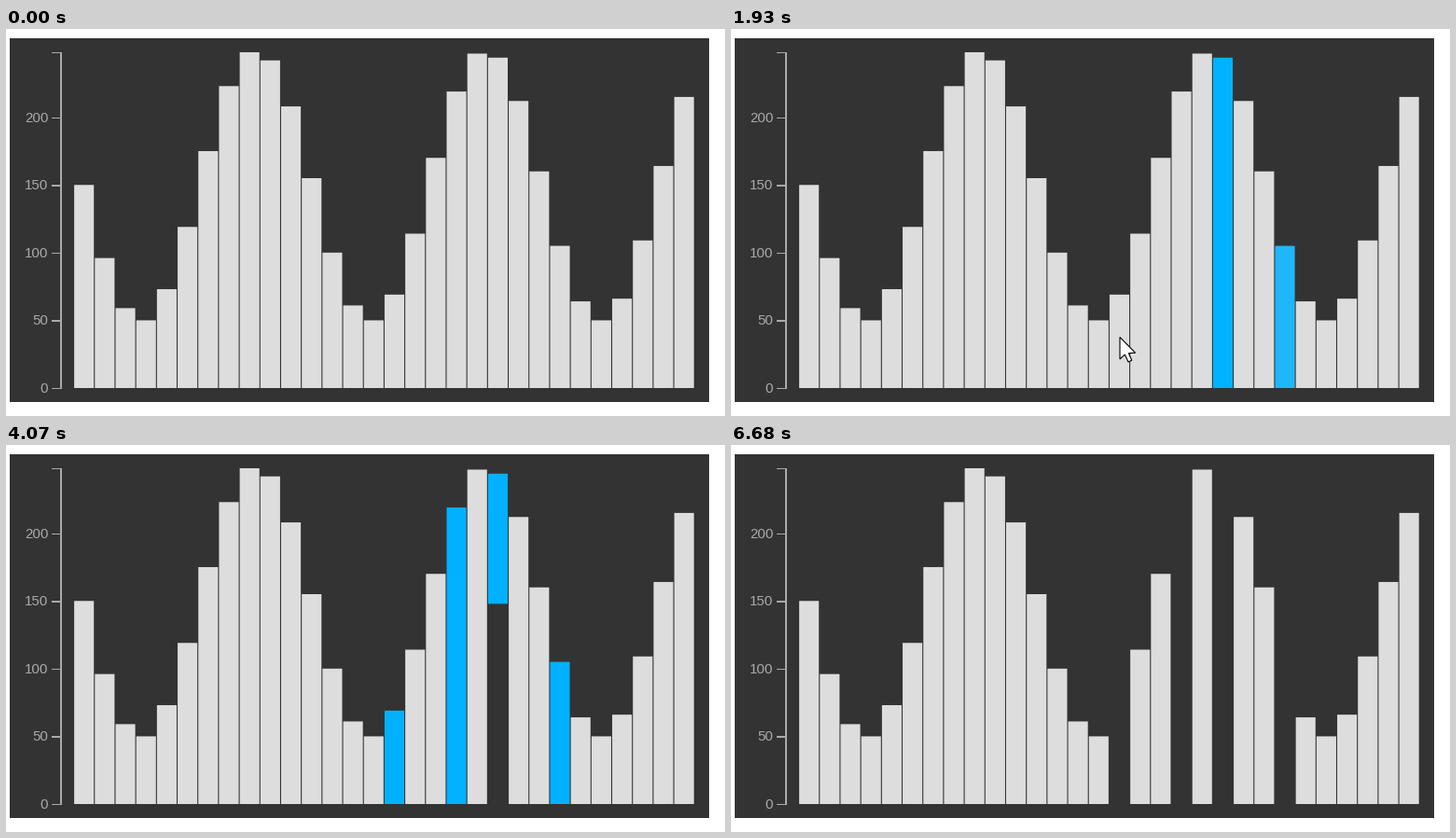
Animation of 771x416 px, one loop 6.98 s. Source, as a matplotlib script:

```python
import numpy as np
import matplotlib.pyplot as plt
from matplotlib.animation import FuncAnimation
from matplotlib.patches import Circle, Polygon, Rectangle

W, H, DPI = 771, 416, 100
LOOP, STEP = 6980, 20
TICK = 76.7                     # the picture is refreshed on this slower beat

TOP, BASE = 26, 386             # ends of the value axis
X0, PITCH, BAR_W = 73.1, 22.19, 21.1
GREY = np.array([221, 221, 221]) / 255
BLUE = np.array([0, 177, 255]) / 255
AXIS, LINE = "#aaaaaa", 1.45

TINT_MS = 1200
SHRINK_FROM, SHRINK_GAP, SHRINK_MS = 3500, 700, 1050
PRESS_LEAD, PRESS_HOLD = 60, 160

# clicks: bar, time, pointer height, time of moving on
CLICKS = [(20, 450, 334, 610), (23, 1104, 327, 1450),
          (15, 1980, 331, 2150), (18, 2662, 330.5, 2930)]
ENTER, ENTRY = 70, (532, 381)
LEAVE, EXIT = 3370, (549, 375.5)
ARROW = np.array([(0, 0), (0, 23.5), (5.3, 18.6), (9, 26.5), (12.8, 24.8),
                  (9.4, 17.2), (16.6, 16.8)]) + 0.5


def clamp(t):
    return min(max(t, 0), 1)


def cubic(t):
    """Cubic ease in and out."""
    t = clamp(t)
    return 4 * t ** 3 if t < 0.5 else 1 - 4 * (1 - t) ** 3


def pointer(t):
    """Glide from stop to stop, slowing down on arrival."""
    pos, left = np.array(ENTRY, float), ENTER
    stops = [((X0 + k * PITCH + BAR_W / 2, y), click - PRESS_LEAD, go)
             for k, click, y, go in CLICKS]
    for goal, arrive, go in stops + [(EXIT, LEAVE, LOOP)]:
        u = clamp((t - left) / (arrive - left))
        pos = pos + (np.array(goal) - pos) * (1 - (1 - u) ** 2)
        left = go
    return pos


def box(x, y, w, h, color, z=1):
    return ax.add_patch(Rectangle((x, y), w, h, fc=color, ec="none", lw=0, zorder=z))


fig = plt.figure(figsize=(W / DPI, H / DPI), dpi=DPI, facecolor="white")
ax = fig.add_axes([0, 0, 1, 1])
ax.set_xlim(0, W)
ax.set_ylim(H, 0)
ax.axis("off")

box(0, 0, W, 1, "#cccccc")
box(4, 11, 750, 390, "#333333")

values = np.floor(150 - 100 * np.sin(0.5663 * np.arange(30)))
scale = (BASE - TOP) / values.max()
heights = values * scale

# value axis
box(58.2, TOP, LINE, BASE - TOP + 1, AXIS)
box(49, TOP, 10, LINE, AXIS)
for value in range(0, 201, 50):
    y = BASE - value * scale
    box(49, y, 10, LINE, AXIS)
    ax.text(45.3, y + 5, str(value), color=AXIS, ha="right", va="baseline",
            family="Liberation Sans", fontsize=15 * 72 / DPI)

bars = [box(X0 + i * PITCH, BASE - h, BAR_W, h, GREY, 2) for i, h in enumerate(heights)]
for bar in bars:
    bar.set_snap(False)

arrow = ax.add_patch(Polygon(ARROW, fc="white", ec="black", lw=0.8,
                             joinstyle="miter", zorder=4))
halo = ax.add_patch(Circle((0, 0), 18, fc=(1, 1, 0, 0.54), ec="none", zorder=5))


def update(i):
    t = (i * STEP + STEP / 2) // TICK * TICK

    for n, (k, click, _, _) in enumerate(CLICKS):
        bars[k].set_facecolor(GREY + (BLUE - GREY) * cubic((t - click) / TINT_MS))
        start = SHRINK_FROM + n * SHRINK_GAP
        left = heights[k] * (1 - cubic((t - start) / SHRINK_MS))
        bars[k].set_height(left)
        bars[k].set_visible(left > 0.1)

    pos = pointer(t)
    arrow.set_xy(ARROW + pos)
    arrow.set_visible(ENTER <= t < LEAVE)
    halo.set_center(pos)
    halo.set_visible(any(-PRESS_LEAD <= t - c[1] < PRESS_HOLD for c in CLICKS))
    return [*bars, arrow, halo]


anim = FuncAnimation(fig, update, frames=LOOP // STEP, interval=STEP,
                     repeat=True, repeat_delay=0, blit=False)
plt.show()
```
